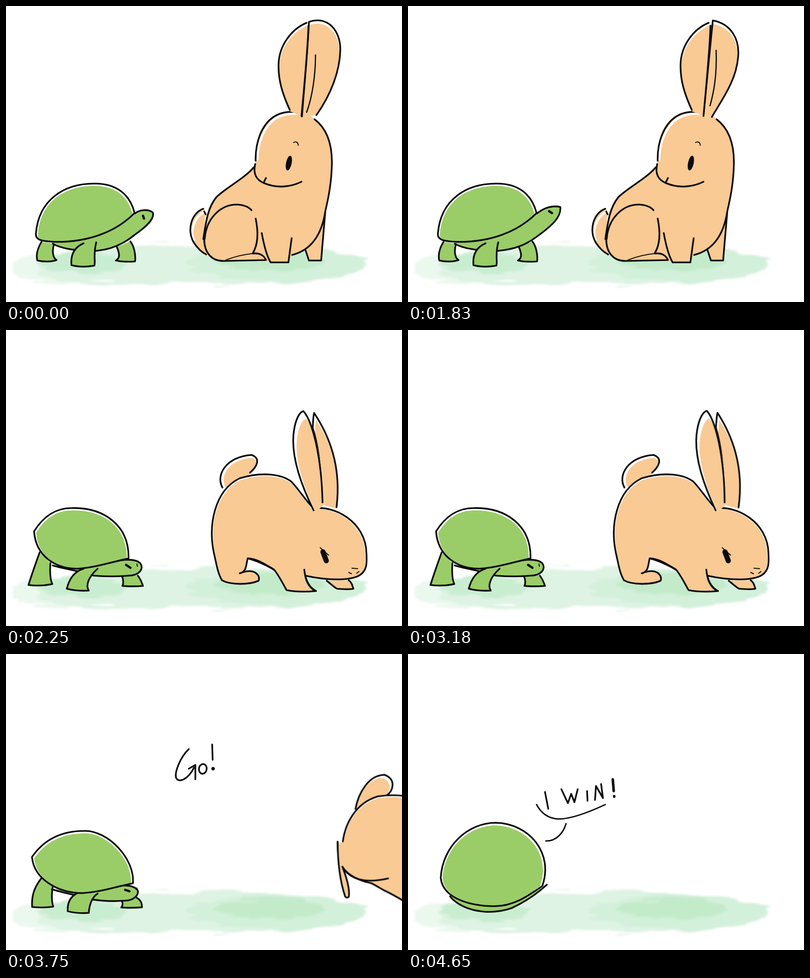
Write an HTML page without scripts that moves like this. It is 847 px wide and 635 px high and loops after 7.31 s.

```html
<!DOCTYPE html>
<html lang="en">
<head>
<meta charset="utf-8">
<title>Tortoise and hare</title>
<style>
html, body { margin: 0; width: 100%; height: 100%; overflow: hidden; background: #fff }
svg { display: block; width: 100vw; height: 100vh }
svg * { animation-duration: 7.31s; animation-iteration-count: infinite; animation-timing-function: linear }
path { fill: none; stroke: #0b0b0b; stroke-width: 3.6; stroke-linecap: round; stroke-linejoin: round }
.thin { stroke-width: 2 }
.ink { fill: #0b0b0b }
.ground path { stroke: none }
.wash1 { fill: #ebf8ee }
.wash2 { fill: #def3e3 }

/* A part is a white base, a slightly smaller colour fill and a line. */
.base { fill: #fff; stroke: none }
.green { fill: #9acd68 }
.tan { fill: #f9ca94 }
.fill { stroke: none }
.gap { stroke: #fff; stroke-width: 5; transform: translate(3.5px, 4px) }

/* Tortoise */
.shell { animation-name: shell }
.shell.fill { transform: scale(.96); transform-origin: 170px 508px }
.neck { animation-name: neck }
.leg-back { animation-name: legBack }
.leg-mid { animation-name: legMid }
.leg-far { animation-name: legFar }
.eye { animation-name: eye; stroke-width: 5 }
@keyframes shell {
  0%, 25.03% { d: path("M64,488 C70,415 125,381 188,381 C240,380 266,408 275,444 C235,485 175,507 105,506 C80,505 62,503 64,488") }
  30.5%, 46% { d: path("M60,432 C80,400 105,382 140,382 C210,380 264,420 262,490 C225,498 190,510 152,512 C105,512 64,485 60,432") }
  49.6%, 51% { d: path("M54,432 C80,400 115,382 165,382 C212,380 272,440 270,490 C230,496 200,508 160,510 C110,510 60,480 54,432") }
  54%, 55.8% { d: path("M69,466 C78,400 130,358 187,358 C262,360 312,430 284,510 C250,528 225,538 185,538 C130,538 62,515 69,466") }
  57.9%, 100% { d: path("M70,480 C74,412 128,362 188,362 C262,364 312,430 287,498 C255,520 225,541 185,541 C135,541 74,525 70,480") }
}
@keyframes neck {
  0%, .41% { d: path("M276,445 C285,437 305,435 314,443 C318,455 305,470 275,491 C250,512 225,522 195,525 C150,527 115,519 100,510") }
  10.26%, 25.03% { d: path("M276,445 C292,432 310,427 326,431 C328,452 310,470 275,495 C250,514 225,522 195,525 C150,527 115,519 100,510") }
  30.5%, 46% { d: path("M215,501 C240,493 275,488 287,500 C296,512 285,527 262,527 C240,529 215,529 188,527 C150,515 120,512 100,505") }
  49.6%, 51% { d: path("M215,501 C240,492 275,488 289,503 C294,513 285,527 262,527 C240,529 215,529 188,526 C150,515 120,512 100,505") }
  54%, 55.8% { d: path("M293,510 C270,522 245,535 220,543 C200,549 180,550 165,549 C140,548 115,538 100,525 C92,517 85,508 82,500") }
  57.9%, 100% { d: path("M297,495 C275,515 250,532 222,545 C205,551 185,554 165,553 C140,551 118,543 104,533 C98,529 93,524 90,520") }
}
@keyframes legBack {
  0%, 25.03% { d: path("M76,506 C67,520 64,535 67,546 C80,549 98,549 108,545 C100,540 98,525 103,510") }
  30.5%, 46% { d: path("M72,477 C60,510 55,525 48,547 C65,549 85,548 99,545 C94,535 94,515 95,500") }
  49.6%, 51% { d: path("M73,478 C55,500 48,520 50,547 C65,548 85,548 99,546 C95,535 95,515 98,500") }
  53%, 100% { d: path("M95,490 C90,500 88,510 88,520 C95,522 105,522 112,520 C110,510 110,500 112,495") }
}
@keyframes legMid {
  0%, 25.03% { d: path("M166,509 C145,518 138,535 140,556 C155,560 172,560 189,557 C192,548 186,535 193,507") }
  30.5%, 46% { d: path("M166,512 C145,518 135,535 130,555 C145,559 160,560 177,559 C170,548 176,530 196,512") }
  49.6%, 51% { d: path("M160,511 C140,517 128,530 129,555 C145,559 160,560 177,559 C178,545 182,525 197,515") }
  53%, 100% { d: path("M160,505 C150,510 145,520 148,535 C155,538 165,538 177,536 C178,525 182,515 190,508") }
}
@keyframes legFar {
  0%, 25.03% { d: path("M237,517 C245,535 242,542 235,546 C248,549 262,549 276,548 C278,535 274,515 266,505") }
  30.5%, 46% { d: path("M248,528 C252,537 251,545 249,549 C262,550 280,550 293,549 C290,540 286,532 282,527") }
  49.6%, 51% { d: path("M249,529 C255,538 254,543 250,547 C265,548 282,548 297,547 C297,535 292,530 285,526") }
  53%, 100% { d: path("M225,505 C230,512 230,520 228,526 C238,527 250,526 258,524 C258,515 255,510 250,505") }
}
@keyframes eye {
  0%, .41% { d: path("M293,450 L295,456") }
  10.26%, 25.03% { d: path("M302,440 L308,444") }
  30.5%, 46% { d: path("M257,504 L266,510") }
  49.6%, 100% { d: path("M255,506 L264,509") }
}

/* Sitting hare */
.sit { animation-name: sit; transform-origin: 560px 548px }
.ear-l.fill { transform: scale(.965); transform-origin: 638px 230px }
.ear-r { animation-name: earR }
.ear-r.fill { transform: scale(.965); transform-origin: 655px 235px }
.fold { animation-name: fold; stroke-width: 2.6 }
@keyframes sit {
  0%, 25.05% { transform: none; visibility: visible }
  27.39% { transform: translate(25px, 0) scale(1.04, .82); visibility: visible }
  27.4%, 100% { visibility: hidden }
}
@keyframes earR {
  0%, .41% { d: path("M633,237 C638,170 645,100 648,34 C690,20 716,55 715,95 C714,140 695,190 664,234") }
  10.6%, 23%, 100% { d: path("M632,235 C638,170 645,100 652,31 C690,38 710,70 706,110 C702,160 672,200 650,238") }
  13%, 22.5% { d: path("M632,235 C648,180 652,80 662,36 C695,32 722,65 719,108 C716,155 685,205 650,237") }
}
@keyframes fold {
  0%, .41% { d: path("M662,105 C662,150 655,195 643,228") }
  10.6%, 23%, 100% { d: path("M659,95 C661,150 654,185 646,214") }
  13%, 22.5% { d: path("M673,104 C668,140 645,170 638,225") }
}

/* Running hare */
.run { animation-name: run; transform-origin: 600px 545px }
.tail { animation-name: tail }
.tail.fill { transform: scale(.9); transform-origin: 530px 330px }
.body { animation-name: body }
.body.fill { transform: scale(.984); transform-origin: 600px 545px }
.paw { animation-name: paw }
.foreleg { animation-name: foreleg }
.thigh { animation-name: thigh }
.ears { animation-name: sway; transform-origin: 680px 385px }
.ear-a { animation-name: earA }
.ear-b { animation-name: earB }
.ears .fill { transform: translate(2px, 2px) scale(.94); transform-origin: 700px 410px }
.look { animation-name: look }
.brow { animation-name: brow }
.nose { animation-name: nose }
@keyframes run {
  0%, 27.39% { visibility: hidden; transform: translate(-30px, -10px) scale(.93, 1.12) }
  27.4% { visibility: visible; transform: translate(-30px, -10px) scale(.93, 1.12) }
  30.5%, 49.8% { visibility: visible; transform: none }
  52.5% { visibility: visible; transform: translate(420px, -10px) }
  52.6%, 100% { visibility: hidden; transform: translate(420px, -10px) }
}
@keyframes tail {
  0%, 46% { d: path("M463,338 C448,312 470,272 525,268 C545,275 538,292 522,306") }
  49.6%, 100% { d: path("M512,338 C518,305 540,264 575,265 C600,275 592,300 580,308") }
}
@keyframes body {
  0%, 46% { d: path("M445,480 C432,420 445,345 500,318 C550,303 590,310 610,325 C625,340 640,365 658,383 C700,375 770,410 771,480 C772,500 772,515 758,525 C740,538 690,538 640,527 C642,540 650,555 663,560 C640,562 620,562 600,558 C590,540 580,520 572,513 C550,500 535,490 517,490 C513,505 515,518 500,522 C535,508 545,530 540,538 C520,547 480,547 462,537 C452,520 450,500 445,480") }
  49.6%, 100% { d: path("M485,408 C490,370 512,325 560,311 C580,308 600,308 615,310 C640,320 655,355 730,445 C775,400 820,440 823,500 C826,522 826,537 812,546 C800,556 760,564 715,550 C710,558 714,568 717,577 C695,575 680,573 665,568 C640,550 600,525 572,512 C560,505 552,500 545,497 C520,492 495,480 484,462 C495,490 500,510 498,526 C495,530 492,528 490,526 C478,490 474,450 474,408") }
}
@keyframes paw {
  0%, 46% { d: path("M686,538 C695,545 702,552 708,555 C720,556 735,557 743,555 C740,545 738,540 733,537") }
  49.6%, 100% { d: path("M801,554 C790,545 758,542 751,551 C755,562 780,570 803,579 C805,572 805,562 801,554") }
}
@keyframes foreleg {
  0%, 46% { d: path("M638,514 C640,535 648,552 663,560") }
  49.6%, 100% { d: path("M684,528 C700,540 712,555 717,577") }
}
@keyframes thigh {
  0%, 46% { d: path("M517,490 C530,493 555,503 574,515") }
  49.6%, 100% { d: path("M484,462 C500,490 535,498 582,487") }
}
@keyframes sway {
  0%, 34.5%, 45.5%, 100% { transform: none }
  38%, 42% { transform: rotate(1.5deg) }
}
@keyframes earA {
  0%, 46% { d: path("M658,387 C630,330 608,265 616,215 C620,190 628,176 636,174 C655,195 675,270 677,370") }
  49.6%, 100% { d: path("M730,445 C690,405 645,350 645,295 C645,275 648,265 653,262 C685,290 725,370 742,432") }
}
@keyframes earB {
  0%, 46% { d: path("M677,372 C676,290 664,235 656,210 C657,195 657,185 659,178 C690,225 718,290 707,380") }
  49.6%, 100% { d: path("M742,430 C725,370 700,320 684,295 C680,275 684,262 688,254 C735,295 765,355 761,428") }
}
@keyframes look {
  0%, 46% { d: path("M678,476 L685,495"); stroke-width: 11 }
  49.6%, 100% { d: path("M751,504 L756,515"); stroke-width: 9 }
}
@keyframes brow {
  0%, 46% { d: path("M672,467 L690,483") }
  49.6%, 100% { d: path("M747,499 L752,504") }
}
@keyframes nose {
  0%, 46% { d: path("M733,520 L739,523 M750,522 L755,518 M740,511 L752,512") }
  49.6%, 100% { d: path("M787,541 L790,545 M798,545 L800,541 M793,549 L797,549") }
}

/* Switches */
.legs, .talk, .nostril { animation-timing-function: step-end }
.legs { animation-name: legs }
.talk { animation-name: talk }
.nostril { animation-name: nostril }
@keyframes legs { 0% { visibility: visible } 52.8%, 100% { visibility: hidden } }
@keyframes talk { 0%, 15%, 22.6%, 100% { visibility: hidden } 11%, 17.6% { visibility: visible } }
@keyframes nostril { 0%, 52.8%, 100% { visibility: hidden } 29.5% { visibility: visible } }

/* Words are written from left to right */
.race { animation-name: race }
.me { animation-name: me }
.go { animation-name: go }
.win { animation-name: win }
@keyframes race {
  0%, 10.6% { clip-path: inset(-9px 100% -9px -9px); visibility: hidden }
  13%, 25% { clip-path: inset(-9px); visibility: visible }
  25.03%, 100% { clip-path: inset(-9px); visibility: hidden }
}
@keyframes me {
  0%, 17.6% { clip-path: inset(-9px 100% -9px -9px); visibility: hidden }
  20.1%, 25% { clip-path: inset(-9px); visibility: visible }
  25.03%, 100% { clip-path: inset(-9px); visibility: hidden }
}
@keyframes go {
  0%, 46% { clip-path: inset(-9px 100% -9px -9px); visibility: hidden }
  49%, 53% { clip-path: inset(-9px); visibility: visible }
  53.03%, 100% { clip-path: inset(-9px); visibility: hidden }
}
@keyframes win {
  0%, 61.9% { clip-path: inset(-9px 85% -9px -9px); visibility: hidden }
  63.6%, 100% { clip-path: inset(-9px); visibility: visible }
}
</style>
</head>
<body>
<svg viewBox="0 0 847 635">
  <defs>
    <filter id="wash">
      <feTurbulence type="fractalNoise" baseFrequency=".012 .11" numOctaves="2" seed="4"/>
      <feDisplacementMap in="SourceGraphic" scale="24" xChannelSelector="R" yChannelSelector="G"/>
      <feGaussianBlur stdDeviation="2"/>
    </filter>
  </defs>

  <g class="ground" filter="url(#wash)">
    <path class="wash1" d="M12,566 C18,535 60,535 140,528 L140,592 C60,595 15,590 12,566"/>
    <path class="wash2" d="M70,548 C130,522 220,516 300,513 C470,502 700,508 772,547 C780,582 600,598 420,596 C260,597 90,596 70,574Z"/>
    <ellipse cx="163" cy="551" rx="94" ry="24" fill="#c9edd1"/>
    <ellipse cx="580" cy="553" rx="192" ry="37" fill="#d3f0da"/>
    <ellipse cx="565" cy="546" rx="116" ry="23" fill="#c3ebca"/>
  </g>

  <g aria-label="tortoise">
    <g class="legs">
      <path class="leg-far green"/>
      <path class="leg-back green"/>
    </g>
    <path class="neck green"/>
    <g class="legs">
      <path class="leg-mid green"/>
      <path class="eye"/>
    </g>
    <path class="talk thin" d="M327,435 L326,445 L320,449 L322,458"/>
    <path class="nostril thin" d="M280,502 L281,507"/>
    <path class="shell base"/>
    <path class="shell green fill"/>
    <path class="shell"/>
  </g>

  <g class="sit" aria-label="hare sitting">
    <path class="tan fill" d="M426,437 C398,440 386,482 402,508 C410,520 420,529 430,535 L425,480Z"/>
    <path class="gap" d="M420,438 C398,450 390,480 398,498"/>
    <path d="M422,435 C396,444 386,482 402,508 C410,520 420,529 428,533 M424,441 L427,447"/>
    <path class="tan fill" d="M532,345 C510,372 470,390 450,410 C432,432 424,470 424,500 C424,530 440,547 465,547 L556,546 L566,550 L604,550 L611,533 C630,530 640,525 643,521 L648,546 L674,546 L683,440 C690,400 697,370 697,320 C694,285 682,258 660,243 L645,230 C615,222 580,228 560,245 C540,265 530,300 534,345"/>
    <path class="gap" d="M534,326 C534,290 548,255 572,238 C592,226 612,224 630,229"/>
    <path d="M534,332 C533,290 548,255 572,238 C592,225 615,225 632,231 M660,243 C685,262 698,295 697,340 C696,380 690,410 683,440 C677,480 660,522 612,534 M683,440 L674,546 L648,546 L640,522 M530,346 C510,370 470,390 450,410 C432,432 428,460 422,500"/>
    <path d="M533,339 C528,360 535,373 552,380 C580,392 610,388 632,377 M552,377 L556,369"/>
    <path d="M425,500 C428,455 460,425 495,426 C510,427 520,432 525,438 M534,456 C540,485 540,510 528,530 M424,500 C424,530 440,547 465,547 L556,545 C552,535 542,529 528,531"/>
    <path d="M547,487 C552,515 557,535 566,550 L604,550 L611,498"/>
    <path class="thin" d="M528,531 C508,533 488,538 470,545 M615,293 C620,290 625,292 625,299"/>
    <ellipse class="ink" cx="605" cy="337" rx="6" ry="16" transform="rotate(12 605 337)"/>
    <path class="ear-r base"/>
    <path class="ear-r tan fill"/>
    <path class="ear-r"/>
    <path class="fold"/>
    <path class="ear-l tan fill" d="M607,226 C592,190 582,160 583,125 C584,85 612,48 648,34 C645,100 638,170 633,237"/>
    <path d="M607,223 C592,190 582,160 583,125 C584,85 610,50 643,36 M647,42 C645,100 638,170 632,236"/>
  </g>

  <g class="run" aria-label="hare running">
    <path class="tail base"/>
    <path class="tail tan fill"/>
    <path class="tail"/>
    <path class="body base"/>
    <path class="body tan fill"/>
    <path class="body"/>
    <path class="paw tan"/>
    <path class="foreleg"/>
    <path class="thigh"/>
    <g class="ears">
      <path class="ear-b base"/>
      <path class="ear-b tan fill"/>
      <path class="ear-b"/>
      <path class="ear-a base"/>
      <path class="ear-a tan fill"/>
      <path class="ear-a"/>
    </g>
    <path class="look"/>
    <path class="brow thin"/>
    <path class="nose thin"/>
  </g>

  <g class="race" role="img" aria-label="Race">
    <path style="stroke-width:2.6" d="M167,280 L174,312 M164,279 C190,278 190,292 172,295 L187,308 M204,290 C193,286 192,303 203,300 L205,289 L209,301 M221,290 C210,288 211,304 222,299 M225,294 L233,290 C234,281 225,281 226,292 C227,299 232,299 236,296"/>
  </g>
  <g class="me" role="img" aria-label="me!">
    <path style="stroke-width:2.8" d="M302,292 L299,272 C306,260 314,266 315,288 C317,260 330,260 333,283 M350,275 L370,267 C367,253 347,259 351,276 C355,287 369,283 376,274 M422,246 L419,268 M418,277 L418,278"/>
  </g>
  <g class="go" role="img" aria-label="Go!">
    <path d="M391,204 C372,222 360,255 364,266 C370,278 390,268 402,244 M391,246 L405,238 L405,269 M421,236 C409,238 411,258 421,257 C432,255 432,236 421,236 M441,194 L442,227 M443,244 A2,2 0 1 1 442.9,244"/>
  </g>
  <g class="win" role="img" aria-label="I win!">
    <path d="M293,296 L300,332 M328,290 L342,320 L349,300 L356,318 L363,290 M383,294 L384,315 M400,313 L402,283 L417,309 L413,279"/>
    <path style="stroke-width:5.5" d="M438,269 L440,294 M441,305 L441,306"/>
    <path style="stroke-width:3" d="M275,323 C285,342 300,353 322,354 C350,354 390,338 422,323 M338,364 C333,382 318,402 295,401"/>
  </g>
</svg>
</body>
</html>
```
